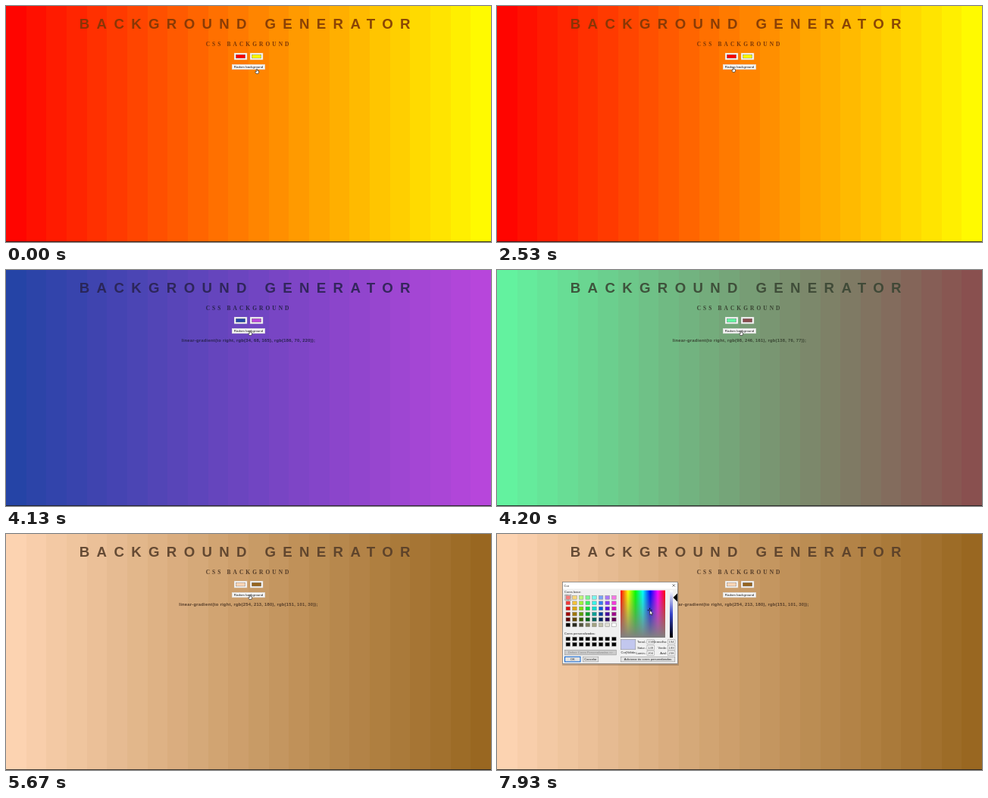
An HTML page that plays this animation: 640 by 312 pixels, repeating every 8000 ms.

```html
<!DOCTYPE html>
<html lang="en">
<head>
<meta charset="utf-8">
<title>Background generator</title>
<style>
html, body { margin: 0; width: 100%; height: 100%; overflow: hidden; }
svg { display: block; width: 100%; height: 100%; }
text { font-family: "Liberation Sans", Arial, sans-serif; white-space: pre; }
#title { font-size: 18.67px; font-weight: 700; letter-spacing: 9.33px; opacity: .88; }
#subtitle { font: 700 7.4px "Liberation Serif", Times, serif; letter-spacing: 3.09px; }
#output { font-size: 5.8px; font-weight: 700; letter-spacing: .26px; }
#dialog text { font-size: 4.1px; fill: #222; }
</style>
</head>
<body>
<svg id="stage" viewBox="0 0 640 312">
  <defs>
    <linearGradient id="hues"></linearGradient>
    <linearGradient id="fade" x2="0" y2="1">
      <stop stop-color="#808080" stop-opacity="0"/><stop offset="1" stop-color="#808080"/>
    </linearGradient>
    <linearGradient id="lumens" x2="0" y2="1">
      <stop stop-color="#fff"/><stop id="lumMid" offset=".5"/><stop offset="1"/>
    </linearGradient>
  </defs>
  <rect y="311" width="640" height="1" fill="#222" opacity=".85"/>
  <g id="words">
    <text id="title" x="96.8" y="30.2">BACKGROUND GENERATOR</text>
    <text id="subtitle" x="263.7" y="53.2">CSS BACKGROUND</text>
    <text id="output" x="320" y="95.4" text-anchor="middle"></text>
  </g>
  <g id="controls"></g>
  <g id="dialog"></g>
  <path id="cursor" fill="#fff" stroke="#111" stroke-width=".6" stroke-linejoin="round"/>
</svg>
<script>
const LOOP = 8000, BANDS = 24;
const DIALOG_OPEN = 6400, PICK_START = 6800;
const $ = id => document.getElementById(id);

function add(parent, tag, attrs, text) {
  const node = document.createElementNS("http://www.w3.org/2000/svg", tag);
  for (const key in attrs) node.setAttribute(key, attrs[key]);
  if (text) node.textContent = text;
  return parent.appendChild(node);
}
const box = (parent, x, y, width, height, fill, more) =>
  add(parent, "rect", { x, y, width, height, fill, ...more });
const label = (parent, x, y, text, anchor = "start", more) =>
  add(parent, "text", { x, y, "text-anchor": anchor, ...more }, text);
const rgb = c => `rgb(${c.map(Math.round).join(", ")})`;
const mix = (a, b, k) => a.map((v, i) => v + (b[i] - v) * k);

const themes = [
  { start: 0, from: [255, 0, 0], to: [255, 255, 0], ink: "#7a3606" },
  { start: 2670, from: [34, 68, 165], to: [186, 70, 220], ink: "#28224e" },
  { start: 4200, from: [98, 246, 161], to: [138, 76, 77], ink: "#384432" },
  { start: 5670, from: [254, 213, 180], to: [151, 101, 30], ink: "#543c28" }
];

// Left-to-right gradient in flat bands of equal width.
function banded({ from, to }) {
  const stops = Array.from({ length: BANDS }, (_, i) =>
    `${rgb(mix(from, to, (i + .5) / BANDS))} ${i / BANDS * 100}% ${(i + 1) / BANDS * 100}%`);
  return `linear-gradient(to right, ${stops})`;
}

// Two colour inputs and the button.
const controls = $("controls");
const swatches = [301, 322].map(x => {
  box(controls, x + .3, 62.3, 16.6, 8.6, "#fff", { stroke: "#ddd", "stroke-width": .6 });
  return box(controls, x + 2.3, 64.2, 12.5, 4.8, "#000", { stroke: "#777", "stroke-width": .5 });
});
box(controls, 298.3, 77.3, 43.4, 6.5, "#f6f6f6", { stroke: "#ddd", "stroke-width": .6 });
label(controls, 320, 82.1, "Radom background", "middle", { "font-size": 4.4, fill: "#111" });

// Colour dialog.
const dialog = $("dialog");
const edge = { stroke: "#888", "stroke-width": .5 };
const button = (x, y, w, text, fill = "#e3e3e3", style = edge) => {
  box(dialog, x, y, w, 6.6, fill, style);
  return label(dialog, x + w / 2, y + 4.8, text, "middle");
};
box(dialog, 86, 65, 154, 109, "#000", { opacity: .18 });
box(dialog, 86.5, 63.5, 152, 108, "#f0f0f0", { stroke: "#777", "stroke-width": .7 });
box(dialog, 87, 64, 151, 8.5, "#fff");
label(dialog, 88.5, 69.5, "Cor");
add(dialog, "path", { d: "M231.5 66.3l3.4 3.4m0-3.4l-3.4 3.4", stroke: "#222", "stroke-width": .6 });
label(dialog, 89, 78.3, "Cores base:");
label(dialog, 89, 133, "Cores personalizadas:");

// Hue by column, darker by row; greys in the last row, then black custom cells.
const cell = (col, y, fill) => box(dialog, 91 + col * 8.65, y, 5.6, 4.8, fill, edge);
for (let col = 0; col < 8; col++) {
  for (let row = 0; row < 6; row++) {
    const fill = row < 5 ? `hsl(${col * 44},90%,${72 - row * 13}%)` : `hsl(60,15%,${col / 7 * 100}%)`;
    cell(col, 81.6 + row * 7.25, fill);
  }
  cell(col, 136.2, "#000");
  cell(col, 143.5, "#000");
}
box(dialog, 89.8, 80.4, 8, 7.2, "none", { stroke: "#222", "stroke-width": .6, "stroke-dasharray": ".7 .5" });

button(89.3, 153.3, 68, "Definir Cores Personalizadas >>", "#ccc").style.fill = "#8a8a8a";
button(89.5, 162.3, 20.5, "OK", "#e3e3e3", { stroke: "#0b62d0", "stroke-width": 1 });
button(113.3, 162.3, 20.5, "Cancelar");
button(163.3, 162.3, 71.5, "Adicionar às cores personalizadas");

const SPECTRUM = { x: 163, y: 74.5, w: 59, h: 62.5 };
for (let i = 0; i <= 6; i++)
  add($("hues"), "stop", { offset: i / 6, "stop-color": `hsl(${i * 60},100%,50%)` });
for (const fill of ["url(#hues)", "url(#fade)"])
  box(dialog, SPECTRUM.x, SPECTRUM.y, SPECTRUM.w, SPECTRUM.h, fill);
box(dialog, 228, 74.5, 4, 62.5, "url(#lumens)");
add(dialog, "path", { d: "M232.5 84l5.5-5.5v11z" });
const cross = add(dialog, "path", {
  d: "M-3 0h2M1 0h2M0-3v2M0 1v2", stroke: "#000", "stroke-width": .9 });
const solid = box(dialog, 163.3, 139.3, 19.5, 13.5, "#fff", edge);
label(dialog, 173, 158, "Cor|Sólida", "middle");

const fields = ["Tonal.:", "Satur.:", "Lumin.:", "Vermelho:", "Verde:", "Azul:"].map((name, i) => {
  const x = i < 3 ? 198 : 225.3, y = 139.8 + (i % 3) * 7.4;
  label(dialog, x - 1, y + 4.3, name, "end");
  box(dialog, x, y, 9.6, 5.8, "#fff", edge);
  return label(dialog, x + 1.3, y + 4.4, "");
});

function toRgb(hue, sat, lum) {
  const h = hue / 20, l = lum / 240, a = sat / 240 * Math.min(l, 1 - l);
  return [0, 4, 2].map(n => {
    const k = (n * 2 + h) % 12;
    return 255 * (l - a * Math.max(-1, Math.min(k - 3, 9 - k, 1)));
  });
}

function showPicked(x, y) {
  const hue = Math.round((x - SPECTRUM.x) / SPECTRUM.w * 239);
  const sat = Math.round((1 - (y - SPECTRUM.y) / SPECTRUM.h) * 240);
  const color = toRgb(hue, sat, 204).map(Math.floor);
  cross.setAttribute("transform", `translate(${x} ${y})`);
  solid.setAttribute("fill", rgb(color));
  $("lumMid").setAttribute("stop-color", rgb(toRgb(hue, sat, 120)));
  [hue, sat, 204, ...color].forEach((v, i) => fields[i].textContent = v);
}

// The pointer rests between eased moves of equal length.
const MOVE_TIME = 280, REST = [331, 83];
const moves = [
  { at: 640, to: [321, 79] },
  { at: 1300, to: [393, 153] },
  { at: 1780, to: [326, 82] },
  { at: 2230, to: [312, 81] },
  { at: 3000, to: [324, 113] },
  { at: 3280, to: [322, 80] },
  { at: 6030, to: [310, 66] },
  { at: 6520, to: [188, 92] },
  { at: 7020, to: [209, 110] },
  { at: 7450, to: [201.6, 100.8] }
];
function pointerAt(t) {
  return moves.reduce((from, { at, to }) => {
    const k = Math.max(0, Math.min(1, (t - at) / MOVE_TIME));
    return mix(from, to, k * k * (3 - 2 * k));
  }, REST);
}
const ARROW = "M0 0V6L1.4 4.8 2.3 6.8 3.3 6.4 2.4 4.4H4.2Z";
const HAND = "M-.7 .6Q0-.5.7.6V2.4L2.6 2.9V4.8L1.9 6.4H-.9L-2.4 4 -1.8 3.4 -.7 4Z";

function draw(t) {
  const theme = themes.findLast(item => item.start <= t);
  $("stage").style.background = banded(theme);
  $("words").setAttribute("fill", theme.ink);
  swatches[0].setAttribute("fill", rgb(theme.from));
  swatches[1].setAttribute("fill", rgb(theme.to));
  $("output").textContent = theme.start
    ? `linear-gradient(to right, ${rgb(theme.from)}, ${rgb(theme.to)});` : "";

  const [x, y] = pointerAt(t);
  const onButton = x > 298 && x < 342 && y > 77 && y < 84;
  $("cursor").setAttribute("d", onButton ? HAND : ARROW);
  $("cursor").setAttribute("transform", `translate(${x} ${y})`);

  dialog.style.display = t >= DIALOG_OPEN ? "" : "none";
  if (t < PICK_START) showPicked(167.4, 76);
  else showPicked(x, y);
}

function tick() {
  draw(performance.now() % LOOP);
  requestAnimationFrame(tick);
}
tick();
</script>
</body>
</html>
```
